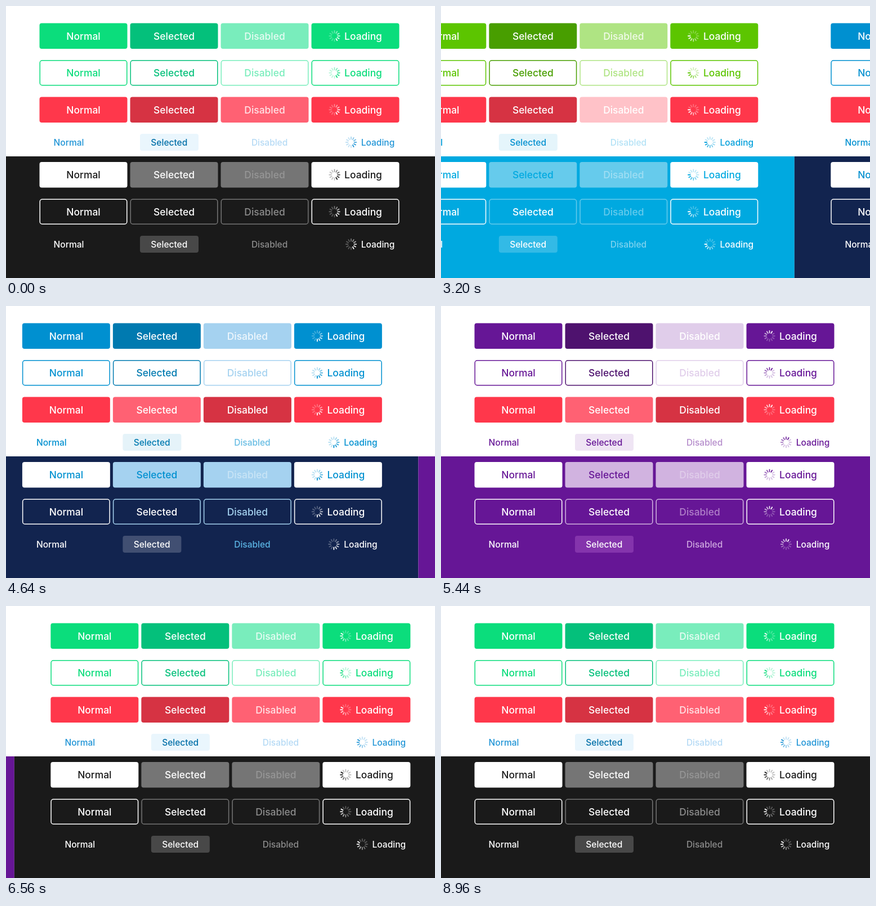
These frames come from a looping animation (762 by 483 pixels, 9120 ms). An HTML page with a canvas:

```html
<!DOCTYPE html>
<html lang="en">
<head>
<meta charset="utf-8">
<title>Button themes</title>
<style>
  html, body { margin: 0; width: 100%; height: 100%; overflow: hidden; background: #fff; }
  canvas { display: block; }
</style>
</head>
<body>
<canvas id="stage" width="762" height="483"></canvas>
<script>
const ctx = document.getElementById('stage').getContext('2d');
const LOOP = 9120, STEP = 160, STRIDE = 768;
const SWIPES = [1702, 3060, 4575, 6090], SWIPE_TIME = 560;
const SPIN_TIME = 1200;
const LABELS = ['Normal', 'Selected', 'Disabled', 'Loading'];
const WHITE = '#fff', FADED = 'rgba(255,255,255,.82)';

// State lists run normal, selected, disabled; loading reuses normal.
const THEMES = [
  {
    phase: 150, back: '#1a1a1a',
    main: ['#0bdd7c', '#04c07b', '#79edbc'], mainOff: FADED,
    alert: ['#ff374b', '#d63343', '#ff6173'], alertOff: FADED,
    link: ['#1f94d6', '#006fa8', '#b5daf5'], linkFill: '#eaf6fd',
    soft: '#757575', softText: [WHITE, '#969696'],
    lineOff: '#8c8c8c', darkFill: '#484848', darkOff: '#8c8c8c'
  },
  {
    phase: 30, back: '#00a9e0',
    main: ['#5cc500', '#489e00', '#afe483'], mainOff: FADED,
    alert: ['#ff374b', '#d63343', '#ffc2c8'], alertOff: WHITE,
    link: ['#009fdb', '#0090d0', '#b2e2f6'], linkFill: '#e5f5fb',
    soft: '#66cbec', softText: ['#00a9e0', '#a0def3'],
    lineOff: '#66cbec', darkFill: '#33bae6', darkOff: '#7fd3ef'
  },
  {
    phase: 245, back: '#12244f',
    main: ['#0090d0', '#007ab0', '#a5d2f0'], mainOff: FADED,
    alert: ['#ff374b', '#ff6173', '#d63343'], alertOff: WHITE,
    link: ['#0090d0', '#007ab0', '#66bce3'], linkFill: '#e5f3f9',
    soft: '#a5d2f0', softText: ['#0090d0', '#c8e4f6'],
    lineOff: '#a5d2f0', darkFill: '#414f72', darkOff: '#5bb5e5'
  },
  {
    phase: 200, back: '#661696',
    main: ['#661696', '#4e126e', '#e0cdea'], mainOff: WHITE,
    alert: ['#ff374b', '#ff6173', '#d63343'], alertOff: WHITE,
    link: ['#661696', '#661696', '#b58ccb'], linkFill: '#efe5f4',
    soft: '#d1b3e0', softText: ['#661696', '#e0cdea'],
    lineOff: '#b07fc9', darkFill: '#8434ac', darkOff: '#cfa9e0'
  }
];

function box(x, y, w, h, fill, stroke) {
  ctx.beginPath();
  ctx.roundRect(x, y, w, h, 4);
  if (fill) { ctx.fillStyle = fill; ctx.fill(); }
  if (stroke) { ctx.strokeStyle = stroke; ctx.lineWidth = 1.5; ctx.stroke(); }
}

function text(label, x, y, size, color) {
  ctx.font = `500 ${size}px Inter, sans-serif`;
  ctx.textAlign = 'center';
  ctx.fillStyle = color;
  ctx.fillText(label, x, y + size * 0.364);
}

function spinner(x, y, color, head) {
  ctx.save();
  ctx.translate(x, y);
  ctx.strokeStyle = color;
  ctx.lineWidth = 1.8;
  ctx.lineCap = 'round';
  for (let i = 0; i < 12; i++) {
    const age = (head - i + 12) % 12;
    ctx.globalAlpha = Math.max(0.28, 1 - age * 0.12);
    ctx.beginPath();
    ctx.moveTo(0, -5.6);
    ctx.lineTo(0, -9.3);
    ctx.stroke();
    ctx.rotate(Math.PI / 6);
  }
  ctx.restore();
}

function buttonRow(y, fills, lines, inks, head) {
  LABELS.forEach((label, i) => {
    const x = 59.5 + i * 161, k = i % 3, mid = y + 22.75;
    if (fills) box(x, y, 156, 45.5, fills[k]);
    else box(x + 0.75, y + 0.75, 154.5, 44, null, lines[k]);
    if (i === 3) spinner(583.5, mid, inks[0], head);
    text(label, i === 3 ? 634.5 : x + 78, mid, 17.4, inks[k]);
  });
}

function linkRow(y, fill, inks, head) {
  box(238, y - 15, 104, 30, fill);
  LABELS.forEach((label, i) => {
    if (i === 3) spinner(613, y, inks[0], head);
    text(label, i === 3 ? 660.5 : 111.5 + i * 178.3, y, 15.5, inks[i % 3]);
  });
}

function page(theme, x, time) {
  const angle = theme.phase + time / SPIN_TIME * 360;
  const head = Math.floor(angle / 30) % 12;
  const { main, alert, link, soft, softText, back } = theme;
  ctx.save();
  ctx.translate(x, 0);
  ctx.fillStyle = back;
  ctx.fillRect(-5, 267, STRIDE, 216);
  buttonRow(30.5, main, null, [WHITE, WHITE, theme.mainOff], head);
  buttonRow(96, null, main, main, head);
  buttonRow(161.5, alert, null, [WHITE, WHITE, theme.alertOff], head);
  linkRow(242, theme.linkFill, link, head);
  const ink = back === '#12244f' ? main[0] : back;
  buttonRow(277, [WHITE, soft, soft], null, [ink, ...softText], head);
  buttonRow(342.5, null, [WHITE, soft, soft], [WHITE, WHITE, theme.lineOff], head);
  linkRow(423, theme.darkFill, [WHITE, WHITE, theme.darkOff], head);
  ctx.restore();
}

function swipe(time, start) {
  const u = Math.min(1, Math.max(0, (time - start) / SWIPE_TIME));
  return 1 - (1 - u * u) ** 3;
}

function draw(now) {
  const time = Math.floor(now % LOOP / STEP) * STEP;
  const position = SWIPES.reduce((sum, start) => sum + swipe(time, start), 0);
  const first = Math.floor(position);
  ctx.fillStyle = WHITE;
  ctx.fillRect(0, 0, 762, 483);
  for (const n of [first, first + 1]) {
    page(THEMES[n % 4], (n - position) * STRIDE, time);
  }
  requestAnimationFrame(draw);
}
requestAnimationFrame(draw);
</script>
</body>
</html>
```
